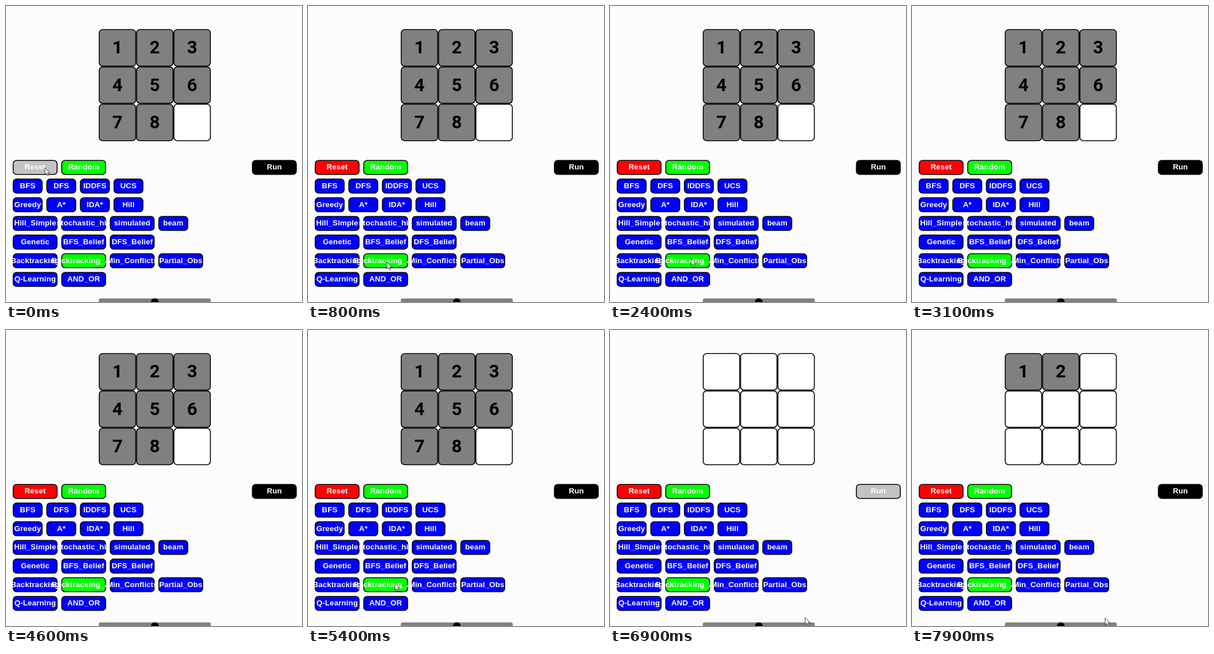
These frames come from a looping animation (518 by 518 pixels, 8000 ms). An HTML page:

```html
<!DOCTYPE html>
<html lang="en">
<head>
<meta charset="utf-8">
<title>Eight puzzle solver</title>
<style>
html, body { margin: 0; width: 100%; height: 100%; overflow: hidden; background: #fcfcfc; }
svg { display: block; width: 100vw; height: 100vh; }
text { font-weight: bold; text-anchor: middle; }
.label { font-family: "Liberation Sans", Arial, sans-serif; font-size: 13.4px; letter-spacing: 0.12px; fill: #fff; }
.digit { font-family: Roboto, "Liberation Sans", sans-serif; font-size: 31.5px; fill: #000; }
.box { stroke: #000; stroke-width: 1.6; }
</style>
</head>
<body>
<svg id="stage" viewBox="0 0 518 518"></svg>
<script>
const LOOP = 8000, STEP = 100;
const U = 0.6533; // size of one layout unit on the stage
const BLUE = '#0000ff', GREEN = '#00ff00', RED = '#ff0000', HOVER = '#c3c3c3', GREY = '#808080';
const stage = document.getElementById('stage');

function add(tag, attrs, text) {
  const el = document.createElementNS('http://www.w3.org/2000/svg', tag);
  for (const key in attrs) el.setAttribute(key, attrs[key]);
  if (text) el.textContent = text;
  return stage.appendChild(el);
}

function box(x, y, w, h, fill) {
  return add('rect', {
    class: 'box', x: x + 0.8, y: y + 0.8, width: w - 1.6, height: h - 1.6, rx: 5.8, fill
  });
}

// Board
const tiles = [];
for (let i = 0; i < 9; i++) {
  const size = 100 * U;
  const x = 162.4 + (i % 3) * size, y = 40.5 + Math.floor(i / 3) * size;
  const rect = box(x, y, size, size, '#fff');
  const digit = i < 8 && add('text', { class: 'digit', x: x + size / 2, y: y + 42.8 }, String(i + 1));
  tiles.push({ rect, digit });
}

// Buttons; a leading dot marks a narrow one
const rows = [
  'Reset Random',
  '.BFS .DFS .IDDFS .UCS',
  '.Greedy .A* .IDA* .Hill',
  'Hill_Simple stochastic_hill simulated .beam',
  'Genetic BFS_Belief DFS_Belief',
  'Backtracking Backtracking_AC Min_Conflicts Partial_Obs',
  'Q-Learning AND_OR'
];
const SELECTED = 'Backtracking_AC';
const special = { Reset: RED, Random: GREEN, [SELECTED]: GREEN, Run: '#000' };
const buttons = [];

function addButton(name, x, row, w) {
  const y = 269.4 + row * 50 * U, h = 40 * U, color = special[name] || BLUE;
  const rect = box(x, y, w, h, color);
  add('text', { class: 'label', x: x + w / 2, y: y + 16.9 }, name);
  buttons.push({ name, x, y, w, h, color, rect });
}

rows.forEach((row, r) => {
  let x = 11.8;
  for (const item of row.split(' ')) {
    const narrow = item[0] === '.';
    const w = (narrow ? 80 : 120) * U;
    addButton(narrow ? item.slice(1) : item, x, r, w);
    x += w + 10 * U;
  }
});
addButton('Run', 430.4, 0, 120 * U);

// Speed slider
add('rect', { x: 162.4, y: 511.7, width: 300 * U, height: 20 * U, rx: 3.3, fill: GREY });
add('circle', { cx: 260.4, cy: 518.2, r: 6.7, fill: '#000' });

const cursor = add('path', {
  d: 'M0 0V12.2L2.8 9.6L4.8 14L6.9 13.1L5 8.9H8.8Z',
  fill: '#f4f4f4', stroke: '#333', 'stroke-width': 0.9, 'stroke-linejoin': 'round'
});

// Pointer stops: time, x, y
const path = [
  [0, 68, 283], [100, 71, 290], [600, 138, 448], [800, 138, 448], [1600, 142, 442], [2600, 142, 442],
  [4900, 197, 520], [5300, 164, 460], [5400, 152, 443], [5500, 152, 443],
  [6200, 499, 278], [6400, 499, 278], [6900, 341.5, 503], [7400, 339.5, 503], [7900, 338, 504]
];
const PRESS = 6400, FIRST = 7400, SECOND = 7800;

function pointer(t) {
  if (t >= 2600 && t < 4900) return null;
  const i = path.findIndex(p => p[0] > t);
  if (i < 0) return path[path.length - 1].slice(1);
  const [t0, x0, y0] = path[i - 1], [t1, x1, y1] = path[i];
  const k = (t - t0) / (t1 - t0), e = k * k * (3 - 2 * k);
  return [x0 + (x1 - x0) * e, y0 + (y1 - y0) * e];
}

function inside(b, p) {
  return p && p[0] >= b.x && p[0] <= b.x + b.w && p[1] >= b.y && p[1] <= b.y + b.h;
}

function render(t) {
  const p = pointer(t);
  cursor.setAttribute('visibility', p ? 'visible' : 'hidden');
  if (p) cursor.setAttribute('transform', `translate(${p[0]} ${p[1]})`);

  const filled = t < PRESS ? 8 : t < FIRST ? 0 : t < SECOND ? 1 : 2;
  tiles.forEach(({ rect, digit }, i) => {
    rect.setAttribute('fill', i < filled ? GREY : '#fff');
    if (digit) digit.setAttribute('visibility', i < filled ? 'visible' : 'hidden');
  });

  // The interface stays frozen until the solver draws its first tile
  const frozen = t >= PRESS && t < FIRST;
  for (const b of buttons) {
    const over = frozen ? b.name === 'Run' : b.name !== SELECTED && inside(b, p);
    b.rect.setAttribute('fill', over ? HOVER : b.color);
  }
}

const start = performance.now();
function frame() {
  const t = (performance.now() - start) % LOOP;
  render(Math.floor(t / STEP) * STEP);
  requestAnimationFrame(frame);
}
frame();
</script>
</body>
</html>
```
